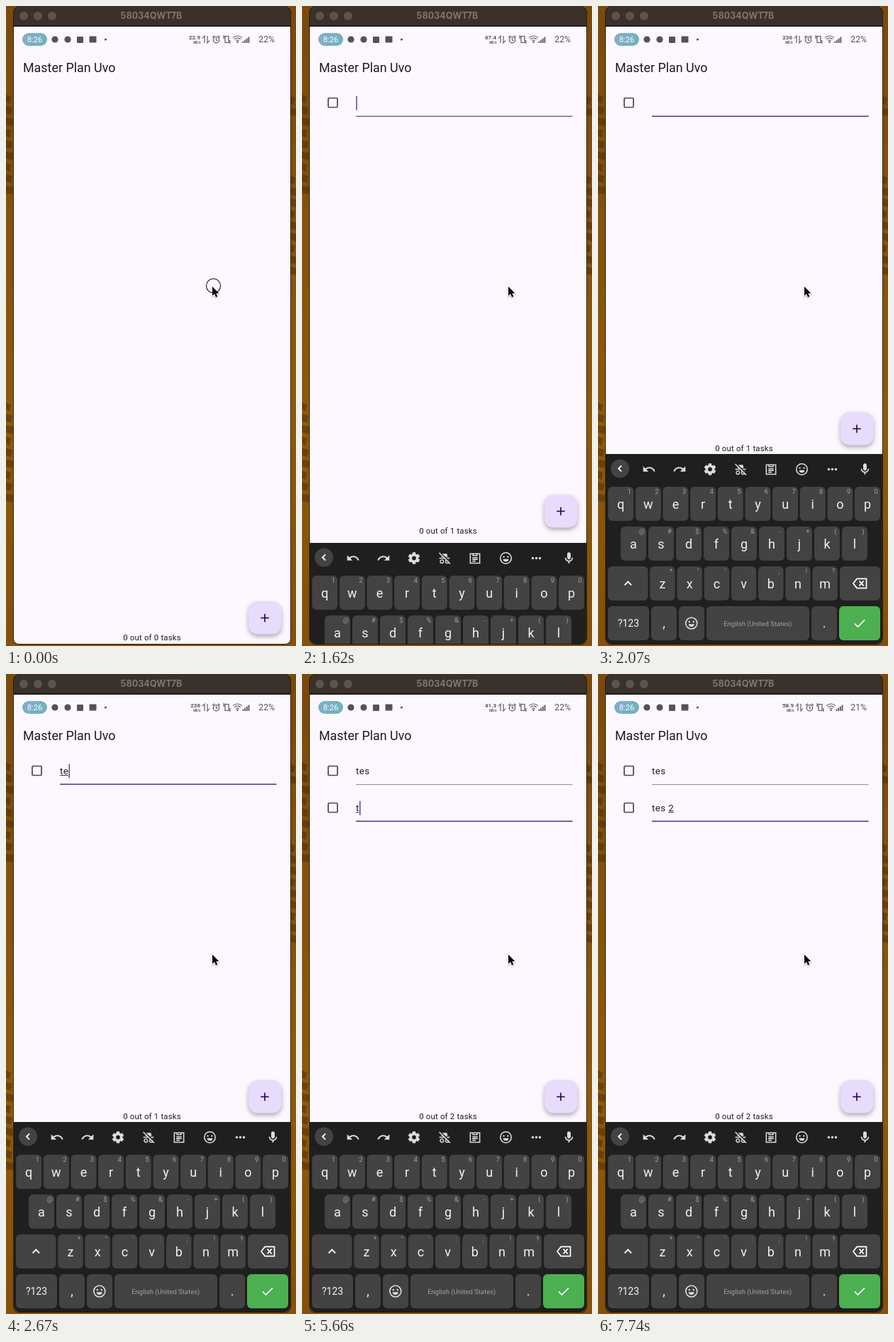
Animation of 409 by 900 pixels, one loop 8000 ms. Source, as an HTML page with a canvas:

```html
<!DOCTYPE html>
<html lang="en">
<head>
<meta charset="utf-8">
<title>Task list demo</title>
<style>
html, body { margin: 0; width: 100%; height: 100%; overflow: hidden; background: #85520f; }
canvas { display: block; width: 409px; height: 900px; }
</style>
</head>
<body>
<canvas id="stage"></canvas>
<script>
const W = 409, H = 900, LOOP = 8000;
const canvas = document.getElementById('stage');
const dpr = window.devicePixelRatio || 1;
canvas.width = W * dpr;
canvas.height = H * dpr;
const c = canvas.getContext('2d');

const PAPER = '#fdf8ff', INK = '#1d1b20', PURPLE = '#6750a4', GREY = '#938f96';
const KEY = '#434343', KEY_LIT = '#666666', ICON = '#dcdcdc', STATUS = '#555257';

// Each track lists [start time, value]; a value holds until the next one.
const tracks = {
  speed: [[0, '22.9'], [1030, '67.4'], [2070, '236'], [3120, '18.6'], [4020, '32.8'],
    [5060, '41.3'], [6110, '62'], [7150, '58.9']],
  battery: [[0, '22%'], [6110, '21%']],
  rows: [[0, 0], [740, 1], [4620, 2]],
  ripple: [[0, 0], [740, 0.09], [1030, 0.04], [1180, 0], [4470, 0.06], [4620, 0.09], [4760, 0.05],
    [4910, 0.02], [5060, 0]],
  lift: [[0, 0], [1620, 150], [1770, 256], [1920, 265], [2070, 266]],
  keyboard: [[0, 270], [1620, 125], [1770, 15], [1920, 2], [2070, 0]],
  focus1: [[0, 0], [1620, 0.6], [1770, 1], [4910, 0.4], [5060, 0]],
  focus2: [[0, 0], [4910, 0.6], [5060, 1]],
  text1: [[0, ''], [2370, 't'], [2670, 'te'], [2820, 'tes']],
  text2: [[0, ''], [5510, 't'], [5810, 'te'], [5960, 'tes'], [6700, 'tes '], [7290, 'tes 2']],
  caret: [[0, 0], [1620, 1], [2070, 0], [2370, 1], [3420, 0], [3870, 1], [4320, 0], [4760, 2],
    [5360, 0], [5510, 2], [6410, 0], [6700, 2], [7740, 0]],
  pressed: [[0, ''], [6560, 'space'], [6700, ''], [7000, 'w'], [7290, '']]
};

function at(name, t) {
  let value;
  for (const [start, v] of tracks[name]) if (t >= start) value = v;
  return value;
}

function box(x, y, w, h, r, fill) {
  c.beginPath();
  c.roundRect(x, y, w, h, r);
  c.fillStyle = fill;
  c.fill();
}

function disc(x, y, r, fill) {
  c.beginPath();
  c.arc(x, y, r, 0, Math.PI * 2);
  c.fillStyle = fill;
  c.fill();
}

function ring(x, y, r, color, width) {
  c.beginPath();
  c.arc(x, y, r, 0, Math.PI * 2);
  c.strokeStyle = color;
  c.lineWidth = width;
  c.stroke();
}

function label(s, x, y, size, color, { align = 'left', weight = 400, space = 0, font = 'Roboto' } = {}) {
  c.font = `${weight} ${size}px ${font}, sans-serif`;
  c.letterSpacing = space + 'px';
  c.textAlign = align;
  c.fillStyle = color;
  c.fillText(s, x, y);
  const width = c.measureText(s).width;
  c.letterSpacing = '0px';
  return width;
}

// Draws a path on a 24-unit grid centred on x, y.
function glyph(d, x, y, scale, color, stroke = 0, flip = 1) {
  c.save();
  c.translate(x, y);
  c.scale(scale * flip, scale);
  c.translate(-12, -12);
  const p = new Path2D(d);
  if (stroke) {
    c.strokeStyle = color;
    c.lineWidth = stroke;
    c.stroke(p);
  } else {
    c.fillStyle = color;
    c.fill(p);
  }
  c.restore();
}

const UNDO = 'M12.5 8c-2.65 0-5.05 1-6.9 2.6L2 7v9h9l-3.6-3.6c1.4-1.2 3.1-1.9 5.1-1.9 3.5 0 6.5 2.3 7.6 5.5l2.4-.8C21 11 17.1 8 12.5 8z';
const MIC = 'M12 14a3 3 0 0 0 3-3V5a3 3 0 0 0-6 0v6a3 3 0 0 0 3 3zM17 11a5 5 0 0 1-10 0H5c0 3.5 2.6 6.4 6 6.9V21h2v-3.1c3.4-.5 6-3.4 6-6.9z';
const CLIP = 'M4 4.5H20V20.5H4ZM8.5 4.5V7.5H15.5V4.5M7.5 11H16.5M7.5 14H16.5M7.5 17H13';
const ERASE = 'M8 5H22V19H8L2.5 12ZM11.5 8.5L18 15.5M18 8.5L11.5 15.5';
const HAT = 'M8 4.5H16L17.5 10H6.5ZM3 11H21V12.8H3Z';

function wallpaper() {
  const g = c.createLinearGradient(0, 0, 0, H);
  g.addColorStop(0, '#79490d');
  g.addColorStop(0.35, '#85530f');
  g.addColorStop(0.65, '#8f590b');
  g.addColorStop(1, '#84500a');
  c.fillStyle = g;
  c.fillRect(0, 0, W, H);
  for (const [x, from, to] of [[0, 124, 265], [0, 557, 700], [401, 126, 150], [401, 238, 378]]) {
    for (let y = from, i = 0; y < to; y += 16, i++) {
      c.beginPath();
      c.moveTo(x - 2, y);
      c.lineTo(x + 7 + (i % 3) * 2, y + 3);
      c.lineTo(x + 5 + (i % 3) * 2, y + 13);
      c.lineTo(x - 2, y + 10);
      c.fillStyle = 'rgba(64,37,6,.45)';
      c.fill();
    }
  }
}

function titleBar() {
  box(11, 0, 390, 40, 9, '#39312a');
  for (const x of [25, 45, 65]) disc(x, 14, 6, '#5b544e');
  label('58034QWT7B', 205, 18, 12.6, '#7e766f', { align: 'center', weight: 700, font: 'Inter' });
  c.fillStyle = '#15110d';
  c.fillRect(11, 27.5, 390, 1.5);
}

function statusBar(t) {
  const g = c.createLinearGradient(25, 38, 56, 56);
  g.addColorStop(0, '#86adcd');
  g.addColorStop(1, '#6db3b9');
  box(23, 38, 35, 18, 9, g);
  label('8:26', 40.5, 51, 11.2, '#fff', { align: 'center' });
  disc(69, 47, 4.6, STATUS);
  disc(87, 47, 4.6, STATUS);
  box(100, 43, 9, 9, 1, STATUS);
  box(117.5, 42.5, 10, 9, 1, STATUS);
  disc(140.5, 47, 1.6, STATUS);

  const battery = at('battery', t);
  label(battery, 379, 51, 12.2, STATUS, { align: 'right' });
  c.save();
  c.translate(battery === '21%' ? 2 : 0, 0);
  label(at('speed', t), 274, 47, 8, STATUS, { align: 'right', weight: 700 });
  label('kB/s', 274.5, 53, 5, STATUS, { align: 'right', weight: 700 });
  c.strokeStyle = STATUS;
  c.lineWidth = 1.1;
  c.stroke(new Path2D('M280 52V42L277 45.5M284 42V52L287 48.5'));
  ring(296.5, 47.7, 4.2, STATUS, 1.2);
  c.stroke(new Path2D('M296.5 45V48L298.5 49M291.2 44.2L294 41.8M301.8 44.2L299 41.8'));
  c.stroke(new Path2D('M309 42.5H314V51.5H309ZM307.2 41V46M315.8 48V53'));
  for (const r of [3, 6, 9]) {
    c.beginPath();
    c.arc(326.5, 51, r, -Math.PI * 0.75, -Math.PI * 0.25);
    c.stroke();
  }
  disc(326.5, 50.8, 1.2, STATUS);
  for (let i = 0; i < 4; i++) box(333.5 + i * 2.7, 49.5 - i * 2, 1.8, 2.5 + i * 2, 0.4, STATUS);
  c.restore();
}

function taskRow(i, t) {
  const y = 136 + i * 52, n = i + 1;
  const text = at('text' + n, t), focus = at('focus' + n, t);
  c.strokeStyle = '#49454f';
  c.lineWidth = 1.7;
  c.beginPath();
  c.roundRect(37, y - 6.5, 13, 13, 1.2);
  c.stroke();

  c.fillStyle = GREY;
  c.fillRect(76, y + 19, 305.5, 1);
  if (focus) {
    c.globalAlpha = focus;
    c.fillStyle = PURPLE;
    c.fillRect(76, y + 18.2, 305.5, 1.7);
    c.globalAlpha = 1;
  }

  const type = { space: 0.43 };
  const width = label(text, 76, y + 4.5, 13.3, INK, type);
  // The word being composed is underlined while its field has focus.
  const word = text.split(' ').pop();
  if (word && (n === 2 || t < 3870)) {
    const head = label(text.slice(0, text.length - word.length), 76, y + 4.5, 13.3, 'transparent', type);
    c.fillStyle = INK;
    c.fillRect(76 + head, y + 6.2, width - head - 0.4, 0.9);
  }
  if (at('caret', t) === n) {
    c.fillStyle = PURPLE;
    c.fillRect(76.2 + width, y - 9.5, 1.6, 20);
  }
}

function footer(t) {
  const y = 860.5 - at('lift', t);
  c.save();
  c.shadowColor = 'rgba(0,0,0,.32)';
  c.shadowBlur = 6 * dpr;
  c.shadowOffsetY = 3 * dpr;
  box(342, y - 23, 46.5, 46, 13, '#e7dcfc');
  c.restore();
  box(342, y - 23, 46.5, 46, 13, `rgba(79,35,150,${at('ripple', t)})`);
  c.fillStyle = '#21005d';
  c.fillRect(359.3, y - 0.8, 11.4, 1.6);
  c.fillRect(364.2, y - 5.7, 1.6, 11.4);
  label(`0 out of ${at('rows', t)} tasks`, 206, y + 31.6, 11.4, INK, { align: 'center', space: 0.2 });
}

function gear(x, y) {
  c.save();
  c.translate(x, y);
  for (let i = 0; i < 6; i++) {
    c.rotate(Math.PI / 3);
    box(-2.4, -8.3, 4.8, 5, 1, ICON);
  }
  ring(0, 0, 4.6, ICON, 3.4);
  c.restore();
}

function smiley(x, y, r) {
  ring(x, y, r, ICON, 1.6);
  disc(x - r * 0.38, y - r * 0.25, 1.2, ICON);
  disc(x + r * 0.38, y - r * 0.25, 1.2, ICON);
  c.beginPath();
  c.arc(x, y + 0.8, r * 0.52, 0.1, Math.PI - 0.1);
  c.closePath();
  c.fill();
}

function toolbar(y) {
  disc(31, y - 1, 13, KEY);
  glyph('M14.5 7L9.5 12L14.5 17', 31, y - 1, 0.83, '#fff', 2.2);
  glyph(UNDO, 72, y, 0.83, ICON);
  glyph(UNDO, 115, y, 0.83, ICON, 0, -1);
  gear(158, y);
  glyph(HAT, 201, y, 0.83, ICON);
  ring(197.3, y + 4.7, 2.3, ICON, 1.4);
  ring(204.7, y + 4.7, 2.3, ICON, 1.4);
  glyph('M4 2L22 20', 201, y, 0.83, '#1f1f1f', 2.2);
  glyph('M3 3L21.5 21.5', 201, y, 0.83, ICON, 1.8);
  glyph(CLIP, 244, y, 0.83, ICON, 1.9);
  smiley(287.5, y, 7.7);
  for (const dx of [-5, 0, 5]) disc(330.5 + dx, y, 1.7, ICON);
  glyph(MIC, 376.5, y, 0.83, ICON);
}

function keyRow(letters, hints, x, pitch, y, width, lit) {
  [...letters].forEach((ch, i) => {
    const mid = x + i * pitch;
    box(mid - width / 2, y, width, 48, 6, ch === lit ? KEY_LIT : KEY);
    label(ch, mid, y + 31, 18, '#f2f2f2', { align: 'center' });
    label(hints[i], mid + 12, y + 9.5, 9.5, '#a0a0a0', { align: 'center' });
  });
}

function keyboard(t) {
  const lit = at('pressed', t);
  c.save();
  c.translate(0, at('keyboard', t));
  c.fillStyle = '#1f1f1f';
  c.fillRect(11, 630, 390, 270);
  toolbar(651.5);
  keyRow('qwertyuiop', '1234567890', 32.2, 38.65, 676, 36, lit);
  keyRow('asdfghjkl', '@#$%&-+()', 50, 39, 732, 36, lit);
  keyRow('zxcvbnm', '*"\':;!?', 91, 38.2, 788, 35.5, lit);

  box(14, 788, 56.5, 48, 6, KEY);
  glyph('M7 14.5L12 9.5L17 14.5', 42.3, 812, 0.95, '#fff', 1.9);
  box(341, 788, 57, 48, 6, KEY);
  glyph(ERASE, 369, 812, 0.95, '#fff', 1.8);

  box(14, 844, 58, 48, 6, KEY);
  label('?123', 43, 873.3, 14, '#f2f2f2', { align: 'center' });
  box(75, 844, 36, 48, 6, KEY);
  label(',', 93, 874, 18, '#f2f2f2', { align: 'center' });
  box(114, 844, 36, 48, 6, KEY);
  smiley(131.8, 868, 8);
  const space = lit === 'space';
  box(153, 844, 145, 48, 6, space ? KEY_LIT : KEY);
  label('English (United States)', 225.3, 871.7, 9.5, space ? '#fff' : '#a0a0a0', { align: 'center' });
  box(301, 844, 36, 48, 6, KEY);
  label('.', 319, 874, 18, '#f2f2f2', { align: 'center' });
  box(340, 844, 58, 48, 6, '#4caf50');
  glyph('M3.5 12.5L9 18L20.5 6.5', 369, 868, 0.83, '#fff', 2);
  c.restore();
}

function pointer(t) {
  c.save();
  c.shadowColor = 'rgba(0,0,0,.3)';
  c.shadowBlur = 2 * dpr;
  c.shadowOffsetY = dpr;
  const arrow = new Path2D('M291 394.5V407.5L294 404.8L296 409.5L298.3 408.5L296.3 404H300.2Z');
  c.strokeStyle = '#fff';
  c.lineWidth = 1.8;
  c.stroke(arrow);
  c.restore();
  c.fillStyle = '#000';
  c.fill(arrow);
  if (t < 150) ring(292.5, 393.5, 10, '#111', 1.1);
}

function draw(t) {
  c.setTransform(dpr, 0, 0, dpr, 0, 0);
  wallpaper();
  box(10.2, 0, 391.6, 898, [9, 9, 8, 8], '#1a140d');
  c.save();
  c.beginPath();
  c.roundRect(11, 0, 390, 897, [9, 9, 7, 7]);
  c.clip();
  titleBar();
  c.fillStyle = PAPER;
  c.fillRect(11, 29, 390, 868);
  statusBar(t);
  label('Master Plan Uvo', 24, 93.3, 17.9, INK);
  for (let i = 0; i < at('rows', t); i++) taskRow(i, t);
  footer(t);
  if (t >= 1620) keyboard(t);
  c.restore();
  pointer(t);
}

const begin = performance.now();
function tick() {
  draw((performance.now() - begin) % LOOP);
  requestAnimationFrame(tick);
}
tick();
</script>
</body>
</html>
```
